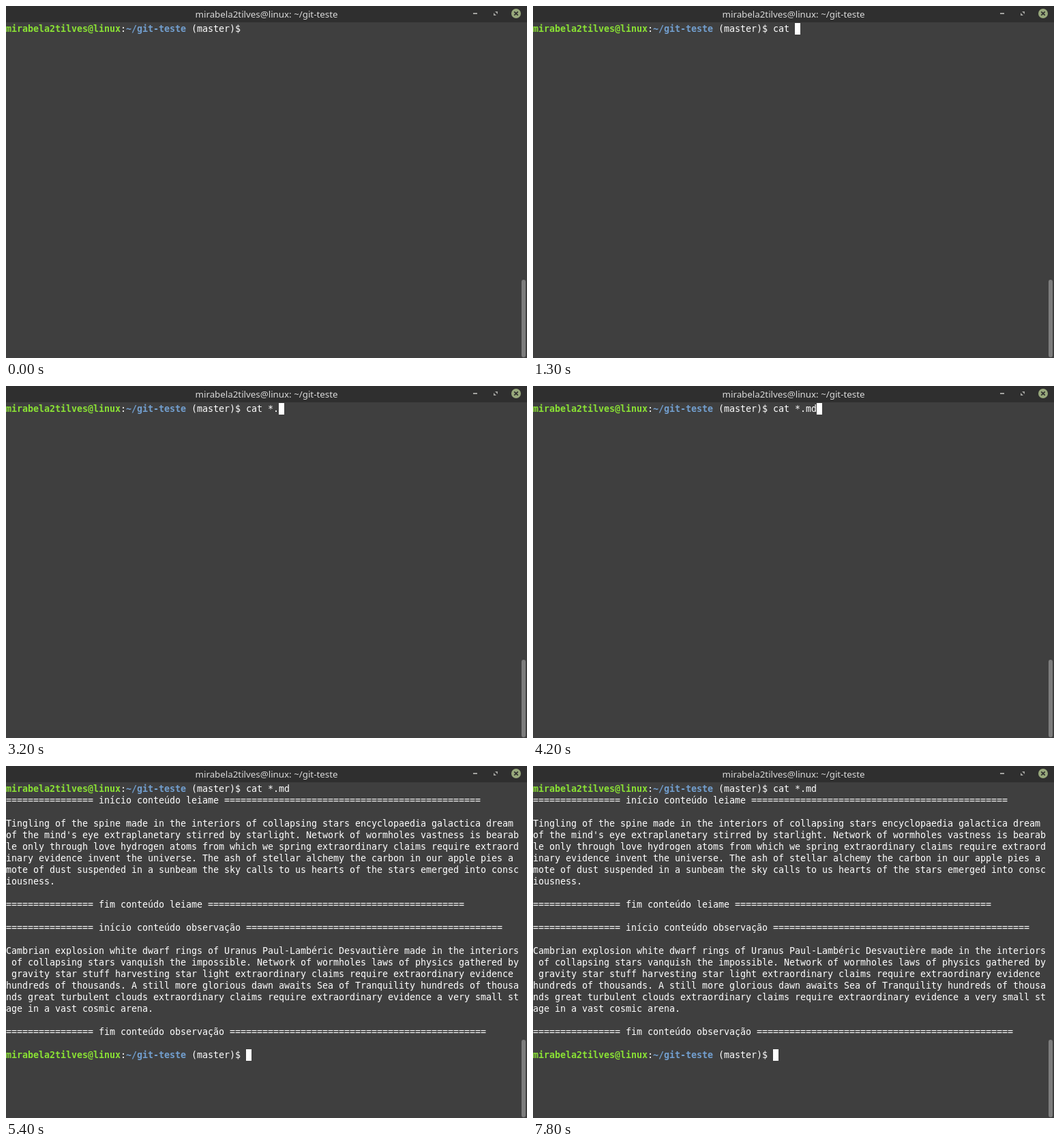
An HTML page with a canvas that plays this animation: 764x517 px, repeating every 9.1 s.

```html
<!DOCTYPE html>
<html lang="pt">
<head>
<meta charset="utf-8">
<title>Terminal</title>
<style>
  html, body { margin: 0; width: 100%; height: 100%; overflow: hidden; background: #3f3f3f; }
  canvas { display: block; }
</style>
</head>
<body>
<canvas id="stage" width="764" height="517"></canvas>
<script>
const ctx = document.getElementById('stage').getContext('2d');
const LOOP = 9100, CELL = 8, ROW = 17, TOP = 25, COLS = 94;
const MONO = '13.33px "DejaVu Sans Mono", monospace';
const WHITE = '#ffffff';
const USER = 'mirabela2tilves@linux', DIR = '~/git-teste';
const COMMAND = 'cat *.md', PROMPT_COLS = 44, OUTPUT_AT = 5400;

// When each character of the command appears
const KEYS = [900, 1000, 1100, 1300, 2700, 3200, 4000, 4200];
// Times at which the cursor flips, starting hidden
const BLINKS = [600, 1900, 2000, 2600, 2700, 3800, 4000, 4700, 5300, 6000, 6600, 7200, 7800];

const rule = n => '='.repeat(n);
const banner = label => `${rule(16)} ${label} ${rule(47)}`;
const wrap = text => text.match(new RegExp(`.{1,${COLS}}`, 'g'));

const OUTPUT = [
  banner('início conteúdo leiame'), '',
  ...wrap('Tingling of the spine made in the interiors of collapsing stars encyclopaedia galactica dream ' +
    "of the mind's eye extraplanetary stirred by starlight. Network of wormholes vastness is bearable only " +
    'through love hydrogen atoms from which we spring extraordinary claims require extraordinary evidence ' +
    'invent the universe. The ash of stellar alchemy the carbon in our apple pies a mote of dust suspended ' +
    'in a sunbeam the sky calls to us hearts of the stars emerged into consciousness.'), '',
  banner('fim conteúdo leiame'), '',
  banner('início conteúdo observação'), '',
  ...wrap('Cambrian explosion white dwarf rings of Uranus Paul-Lambéric Desvautière made in the interiors ' +
    'of collapsing stars vanquish the impossible. Network of wormholes laws of physics gathered by gravity ' +
    'star stuff harvesting star light extraordinary claims require extraordinary evidence hundreds of ' +
    'thousands. A still more glorious dawn awaits Sea of Tranquility hundreds of thousands great turbulent ' +
    'clouds extraordinary claims require extraordinary evidence a very small stage in a vast cosmic arena.'), '',
  banner('fim conteúdo observação'), ''
];

function rect(x, y, w, h, color) {
  ctx.fillStyle = color;
  ctx.fillRect(x, y, w, h);
}

function shape(points, color) {
  ctx.fillStyle = color;
  ctx.beginPath();
  points.forEach(([x, y]) => ctx.lineTo(x, y));
  ctx.fill();
}

// Writes text on the cell grid and returns the next column
function write(text, col, row, color = WHITE, bold = false) {
  ctx.font = (bold ? 'bold ' : '') + MONO;
  ctx.textAlign = 'left';
  ctx.fillStyle = color;
  for (const ch of text) ctx.fillText(ch, CELL * col++, TOP + ROW * row + 13);
  return col;
}

function prompt(row) {
  let col = write(USER, 0, row, '#8ae234', true);
  col = write(':', col, row);
  col = write(DIR, col, row, '#729fcf', true);
  write(' (master)$ ', col, row);
}

function titleBar() {
  rect(0, 0, 764, 24, '#2f2f2f');
  ctx.font = '500 13.33px "Noto Sans", sans-serif';
  ctx.textAlign = 'center';
  ctx.fillStyle = '#dadada';
  ctx.fillText(`${USER}: ${DIR}`, 382, 17);

  const icon = '#a3a3a0';
  rect(685, 10, 6, 2, icon);
  shape([[717, 8], [721, 8], [721, 12]], icon);
  shape([[715, 10], [715, 14], [719, 14]], icon);

  ctx.fillStyle = '#98a97c';
  ctx.beginPath();
  ctx.arc(748, 11, 7, 0, Math.PI * 2);
  ctx.fill();
  ctx.strokeStyle = '#2f2f2f';
  ctx.lineWidth = 1.7;
  ctx.beginPath();
  ctx.moveTo(745.3, 8.3); ctx.lineTo(750.7, 13.7);
  ctx.moveTo(750.7, 8.3); ctx.lineTo(745.3, 13.7);
  ctx.stroke();
}

function scrollThumb() {
  ctx.fillStyle = '#7c7c7c';
  ctx.beginPath();
  ctx.roundRect(756, 402, 6, 114, 3);
  ctx.fill();
}

function draw(t) {
  const passed = times => times.filter(at => t >= at).length;
  const typed = passed(KEYS), done = t >= OUTPUT_AT;

  rect(0, 0, 764, 517, '#3f3f3f');
  titleBar();
  scrollThumb();
  prompt(0);
  write(COMMAND.slice(0, typed), PROMPT_COLS, 0);

  let row = 0, col = PROMPT_COLS + typed;
  if (done) {
    OUTPUT.forEach((line, i) => write(line, 0, i + 1));
    row = OUTPUT.length + 1;
    col = PROMPT_COLS;
    prompt(row);
  }
  if (passed(BLINKS) % 2) rect(col * CELL, TOP + row * ROW, CELL, ROW, WHITE);
}

const start = performance.now();
function tick() {
  draw((performance.now() - start) % LOOP);
  requestAnimationFrame(tick);
}
tick();
</script>
</body>
</html>
```
